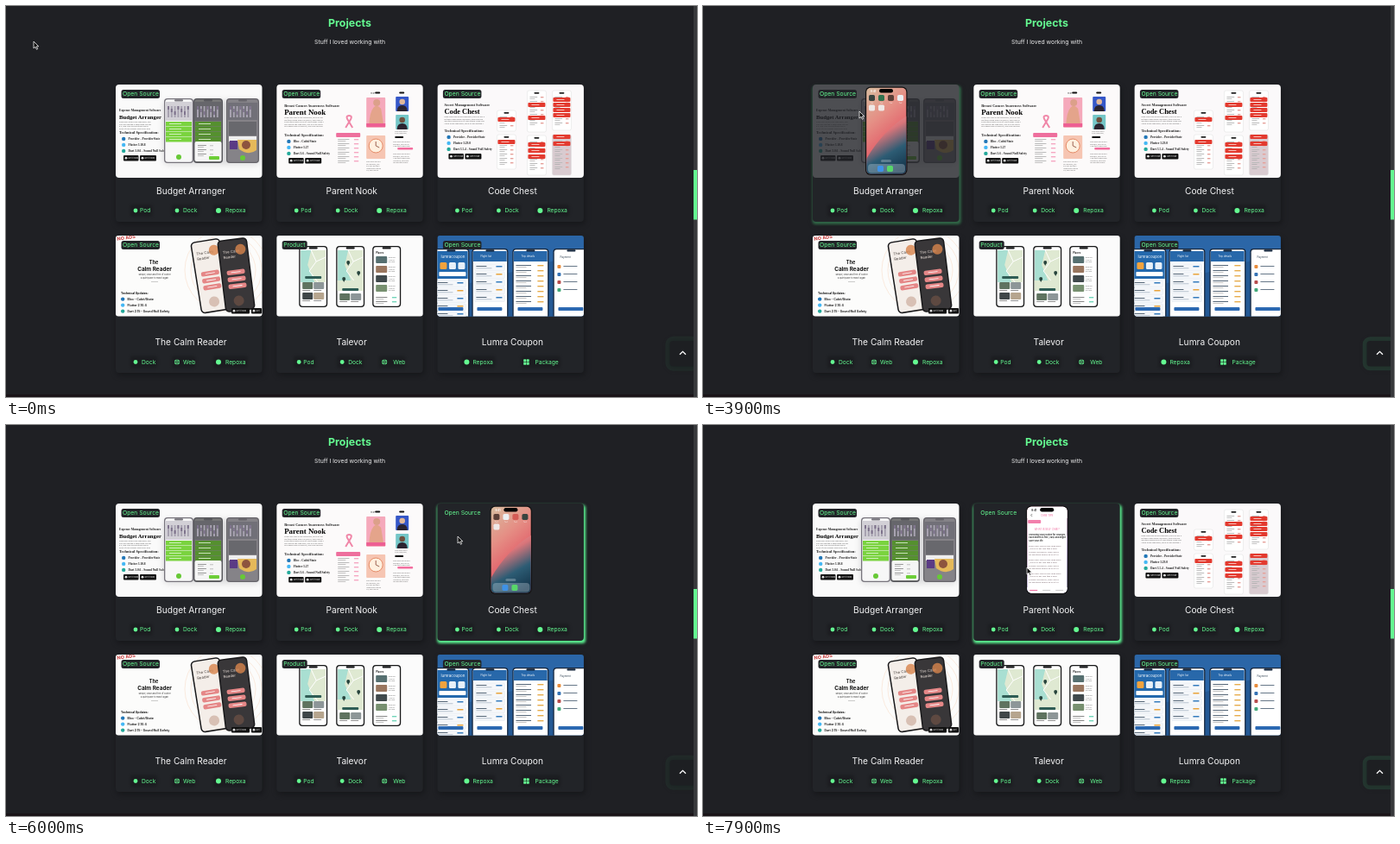
Animation of 800x453 px, one loop 8000 ms. Source, as an HTML page:

```html
<!DOCTYPE html>
<html lang="en">
<head>
<meta charset="utf-8">
<title>Projects</title>
<style>
html, body { margin: 0; width: 100%; height: 100%; overflow: hidden; background: #1f2024; }
svg { position: fixed; left: 0; top: 0; width: 100%; height: 100%; font-family: Inter, "Open Sans", sans-serif; }
.serif { font-family: "Liberation Serif", "Noto Serif", serif; }
.bold { font-weight: 700; }
.mid { text-anchor: middle; }
.glow { filter: blur(1.5px); }
.shade { filter: blur(3px); }
</style>
</head>
<body>
<svg id="stage" viewBox="0 0 800 453"></svg>
<script>
const GREEN = '#64fa91', BG = '#1f2024', CARD = '#222428', DARK = '#1d1f22';
const LOOP = 8000;

// Shape helpers, all returning SVG markup
const rect = (x, y, w, h, fill, r = 0, more = '') =>
  `<rect x="${x}" y="${y}" width="${w}" height="${h}" fill="${fill}" rx="${r}" ${more}/>`;
const dot = (x, y, r, fill, more = '') => `<circle cx="${x}" cy="${y}" r="${r}" fill="${fill}" ${more}/>`;
const text = (x, y, size, str, fill, cls = '') =>
  `<text x="${x}" y="${y}" font-size="${size}" fill="${fill}" class="${cls}">${str}</text>`;
const path = (d, fill, more = '') => `<path d="${d}" fill="${fill}" ${more}/>`;
const group = (x, y, body, more = '') => `<g transform="translate(${x} ${y})" ${more}>${body}</g>`;
const repeat = (n, draw) => Array.from({ length: n }, (_, i) => draw(i)).join('');

const FILLER = 'Keep every note in one calm place, sort it by day and find it again when you need it, with clear lists and quick search on all of your screens. ';
const para = (x, y, n, chars, size = 2.3, step = 2.5, fill = '#555') =>
  repeat(n, i => text(x, y + i * step, size, FILLER.repeat(3).substr(i * chars, chars).trim(), fill, 'serif'));

const badge = (x, y, w) => rect(x, y, w, 6.5, '#111', 1) + dot(x + 3, y + 3.2, 1.4, '#ddd') +
  text(x + 5.5, y + 4.4, 2.4, w > 14 ? 'Get it now' : 'Get', '#fff');

const bullets = (x, y, list, cls) => list.map((s, i) =>
  dot(x + 2.2, y + i * 7 - 1.4, 2.2, ['#2277b8', '#45b8f5', '#24a99b'][i]) +
  text(x + 7.5, y + i * 7, 3.5, s, '#222', 'bold ' + cls)).join('');

function spec(x, y, tech, kicker, kickSize, name, size, lines, chars, items) {
  return text(x, y, kickSize, kicker, '#222', 'serif bold') +
    text(x, y + 9, size, name, '#000', 'serif bold') + para(x, y + 13, lines, chars) +
    text(x, tech, 4.5, 'Technical Specification:', '#222', 'serif bold') +
    bullets(x + 3, tech + 7.3, items, 'serif') +
    badge(x + 5, tech + 25, 17.5) + badge(x + 24, tech + 25, 19);
}

const device = (x, y, w, h, frame, screen, body) =>
  rect(x, y, w, h, frame, 4) + rect(x + 1.3, y + 1.3, w - 2.6, h - 2.6, screen, 3) +
  group(x, y, body) + rect(x + w / 2 - 5, y + 1.2, 10, 2.2, frame, 1);

const rows = (n, x, y, w, step, a, b) => repeat(n, i =>
  rect(x, y + i * step, w * .55, 1, a) + rect(x + w * .78, y + i * step, w * .22, 1.4, b) +
  rect(x, y + i * step + 2, w * .38, .7, '#aaa'));

function budgetArt() {
  const calendar = repeat(7, i => rect(4 + i * 3.8, 9, 2, 13, '#a7a2b0') + rect(4 + i * 3.8, 9 + i % 3 * 3, 2, 4, '#7e738c'));
  const tiles = (c, y) => repeat(4, i => rect(2, y + i * 6, 30, 5.5, c) + rect(6, y + 2 + i * 6, 14, .8, '#e4f8d8'));
  return rect(0, 0, 170, 108, '#fafafa') +
    spec(4, 31, 57, 'Expense Management Software', 3.6, 'Budget Arranger', 6.7, 4, 40,
      ['Provider - ProviderState', 'Flutter 3.10.8', 'Dart 3.0.6 - Sound Null Safety']) +
    rect(55, 18, 112, 75, '#c8c8ca', 6, 'class="shade" opacity=".6"') +
    device(56, 16, 34, 75, '#77747c', '#f7f7f7', rect(1.3, 4, 31, 22, '#d2d0d6') + calendar + tiles('#7ad33f', 27) + dot(17, 68, 3, '#67c936')) +
    device(90, 16, 34, 75, '#55555a', '#777', rect(1.3, 4, 31, 22, '#66666b') + calendar + tiles('#55902f', 27) +
      rect(1.5, 50, 31, 23, '#f5f5f5', 2) + rows(3, 5, 54, 18, 5, '#999', '#ccc') + rect(18, 67, 12, 4, '#6dce38', 1)) +
    device(128, 16, 38, 75, '#66646a', '#858388', rect(2, 5, 34, 20, '#717078') + calendar + rect(3, 27, 32, 16, '#68686d') +
      rect(3, 44, 32, 6, '#eee') + rect(4, 49, 9, 10, '#5b3b85') + path('M13 48H35V60Q26 67 15 59Z', '#e5b95a') +
      dot(23, 54, 5, '#8d543e') + dot(19, 69, 3, '#67c936'));
}

function careArt() {
  const person = (y, bg, tone) => rect(138, y, 15, 17, bg, 1) + dot(145.5, y + 6, 3.3, tone) + path(`M139.5 ${y + 17}q0-7 6-7t6 7Z`, '#2b2430');
  return rect(0, 0, 170, 108, '#fcfafa') +
    spec(9, 26, 60, 'Breast Cancer Awareness Software', 4.3, 'Parent Nook', 8.9, 5, 50,
      ['Bloc - Cubit/State', 'Flutter 3.27', 'Dart 3.6 - Sound Null Safety']) +
    path('M80 50L86 40q2-4-2-4t-2 4L88 50', 'none', 'stroke="#f087a8" stroke-width="2"') +
    rect(69, 56, 28, 5, '#ee6f9d', 1) + rows(6, 71, 63, 24, 5, '#bbb', '#f5a7c2') +
    rect(104, 15, 22, 35, '#f5a9bb', 1) + path('M107 47q1-15 5-20t9 1l3 19Z', '#e4a48b') + dot(116, 21, 4, '#dca08a') +
    rect(104, 45, 22, 4, '#ed5f93') + text(109, 11, 2.6, '9:41', '#222') + rect(114, 8.5, 6, 2, '#111', 1) +
    rect(142, 8.5, 6, 2, '#111', 1) + person(14, '#3557c8', '#e1b89b') + person(35, '#74c6c7', '#70513f') +
    para(137, 55, 2, 17, 2, 2.2) + rect(104, 59, 22, 27, '#f6c5b2', 1) + dot(115, 71, 8, '#fff0df', 'stroke="#e58b67"') +
    path('M115 66v5l4 2', 'none', 'stroke="#9b6252"') + para(104, 90, 5, 20, 2) +
    rect(137, 60, 10, 2, '#111', 1) + para(135, 67, 3, 24, 2) + rect(140, 73, 18, 2.5, '#f36fa0', 1) + para(135, 81, 5, 24, 2);
}

function codeArt() {
  const panel = (x, y, h, bars, bg = '#fff') => rect(x, y, 22, h, bg, 2, 'stroke="#ddd" stroke-width=".5"') +
    rect(x + 8, y + 2, 6, 1.7, '#222', 1) + rows(Math.floor((h - 9) / 5), x + 3, y + 7, 16, 5, '#bbb', '#e6a09a') +
    bars.map(b => rect(x + 1, y + b, 20, 5, '#e33a2f', 1) + rect(x + 5, y + b + 2, 9, .8, '#ffdcd8')).join('');
  return rect(0, 0, 170, 108, '#fbf9fa') +
    spec(8, 25, 55, 'Secret Management Software', 4.2, 'Code Chest', 8.4, 4, 51,
      ['Provider - ProviderState', 'Flutter 3.29.0', 'Dart 3.5.4 - Sound Null Safety']) +
    panel(69, 30, 24, [8]) + panel(69, 58, 40, [6]) + panel(104, 7, 48, [14, 29]) + panel(104, 59, 46, [8, 15, 22]) +
    panel(133, 7, 46, [8, 14, 20, 26]) + panel(133, 58, 47, [0, 8], '#d9cbd0');
}

function readerArt() {
  const slab = (x, y, a, body, ink) => `<g transform="translate(${x} ${y}) rotate(${a})">` +
    rect(0, 0, 35, 84, '#18181a', 5) + rect(1.5, 1.5, 32, 81, body, 4) +
    text(5, 16, 4.4, 'The Calm', ink) + text(5, 22, 4.4, 'Reader', ink) + dot(26, 13, 6, '#d9854d', 'opacity=".8"') +
    repeat(3, i => rect(7, 36 + i * 8, 21, 5.5, '#e58787', 2) + rect(12, 38.3 + i * 8, 11, .8, '#fff')) +
    dot(17, 72, 6, '#a46b50', 'opacity=".35"') + '</g>';
  return rect(0, 0, 170, 94, '#fcfcfb') +
    repeat(5, i => dot(128, 40, 20 + i * 7, 'none', 'stroke="#f2b080" stroke-width=".4" opacity=".6"')) +
    `<g transform="rotate(-8)">${text(1, 6, 5.5, 'NO ADS', '#c83a3a', 'bold')}</g>` +
    text(44, 33, 5.5, 'The', '#111', 'bold mid') + text(45, 40.5, 6.4, 'Calm Reader', '#111', 'bold mid') +
    text(45, 46, 2.5, 'Simple, clear and free of clutter', '#333', 'mid') +
    text(45, 50, 2.4, 'a quiet place to read it again', '#333', 'mid') + rect(41, 53, 8, .5, '#999') +
    text(6, 68, 3.4, 'Technical Updates:', '#111', 'bold') +
    bullets(6, 75, ['Bloc - Cubit/State', 'Flutter 2.10.4', 'Dart 2.15 - Sound Null Safety'], '') +
    slab(86, 8, -9, '#f4eee9', '#4c4440') + slab(117, 6, -7, '#393739', '#eadfd8') +
    badge(134, 84, 21) + badge(157, 84, 12);
}

function storyArt() {
  const map = path('M2 5H31V42H2Z', '#dfe9d2') + path('M2 5H14L10 22 18 42H2Z', '#a9dfd2') +
    path('M14 5L20 18 12 29 22 42M20 18L31 13', 'none', 'stroke="#fff"');
  const photos = (y, n) => repeat(n, i => rect(4 + i % 2 * 13, y + (i >> 1) * 12, 12, 8, ['#5f7360', '#8d9698', '#3f4648', '#b6a58e'][i % 4], 1) +
    rect(4 + i % 2 * 13, y + 9 + (i >> 1) * 12, 9, .8, '#777'));
  const pin = (x, y) => dot(x, y, 2, '#27443d') + path(`M${x - 1.5} ${y + 1}l1.5 3 1.5-3Z`, '#27443d');
  return rect(0, 0, 170, 94, '#fbfbfb') +
    device(26, 12, 33, 71, '#161718', '#fff', map + rect(7, 35, 19, 3, '#2f5d55', 1) + photos(42, 4)) +
    device(69, 12, 33, 71, '#161718', '#fff', map + rect(1.5, 40, 30, 12, '#dfe9d2') + pin(14, 19) + pin(26, 31) + pin(9, 38) + rect(7, 49, 19, 3, '#2f5d55', 1) + photos(55, 2)) +
    device(111, 12, 33, 71, '#161718', '#fff', text(4, 9, 2.8, 'Places', '#222', 'bold') +
      repeat(4, i => rect(4, 12 + i * 11, 13, 8, ['#566f70', '#99765f', '#40494c', '#779070'][i], 1) + para(18.5, 14 + i * 11, 3, 9, 2)) + rows(2, 4, 59, 24, 5, '#888', '#72d5ba'));
}

function couponArt() {
  const head = rect(1.3, 3, 39, 12, '#2868aa');
  const list = y => repeat(5, i => rect(3, y + i * 9, 35, 7.5, '#f5f7fa', 1, 'stroke="#cad6e2" stroke-width=".3"') +
    rect(5, y + 2 + i * 9, 12, 1, '#567') + rect(28, y + 2 + i * 9, 7, 1.5, i % 2 ? '#e9a33b' : '#347bbd') + rect(5, y + 4.5 + i * 9, 18, .7, '#9ab'));
  const foot = rect(6, 68, 29, 4, '#2c69b2', 1);
  return rect(0, 0, 170, 94, '#2b66a7') + path('M0 65L170 20V94H0Z', '#245994') +
    device(-5, 15, 42, 86, '#15263d', '#fff', rect(1.3, 3, 39, 32, '#2469ad') + text(9, 11, 4.5, 'lumracoupon', '#fff') +
      repeat(3, i => rect(8 + i * 10.5, 16, 8, 8, ['#f2a33d', '#e8f0f8', '#e8f0f8'][i], 1.5)) + rect(7, 27, 31, 5, '#fff', 1) + list(37) + foot) +
    device(40, 15, 42, 86, '#15263d', '#fff', head + text(10, 10, 3, 'Flight list', '#fff') + list(18) + foot) +
    device(87, 15, 42, 86, '#15263d', '#fff', head + text(10, 10, 3, 'Trip details', '#fff') + rows(8, 4, 19, 32, 6, '#567', '#e7ac4c') + foot) +
    device(134, 15, 42, 86, '#15263d', '#fff', text(8, 11, 3, 'Payment', '#345') +
      repeat(4, i => rect(5, 19 + i * 9, 4, 4, ['#e78c3c', '#3572b4', '#b74d4d', '#42a879'][i], 1) + rect(12, 20 + i * 9, 16, 1, '#678')) + foot);
}

function home(i) {
  const tints = ['#39443f', '#31724e', '#5d4038', '#eceff2', '#d35b55'];
  const icon = (x, y, c) => rect(x, y, 7, 7, c, 1.7);
  return rect(61, 2, 49, 104, `url(#sky${i % 2})`) + path('M110 36Q82 52 61 88V106H110Z', `url(#hill${i % 2})`) +
    text(67, 9, 3, '9:41', '#fff', 'bold') +
    repeat(4, n => icon(65 + n * 11, 12, tints[(n + i) % 5]) + text(68.5 + n * 11, 21.5, 1.8, 'Tool', '#fff', 'mid')) +
    repeat(i < 2 ? 2 : 1, n => icon(65 + n * 11, 23.5, i === 1 ? '#f18cae' : '#efe8e6')) +
    rect(79, 87, 12, 3, '#fff', 1.5, 'opacity=".25"') + rect(64, 92, 43, 10.5, '#dce8f2', 4, 'opacity=".3"') +
    icon(75, 94, '#3f92e6') + icon(86, 94, '#58d66a');
}

function page(i) {
  const accent = ['#6dca3b', '#ee6b9e', '#e33a2f'][i];
  const bar = rect(61, 2, 49, 15, '#fff') + text(67, 9, 3, '9:41', '#222', 'bold') + path('M68 12l-1.5 1.5 1.5 1.5', 'none', 'stroke="#333" stroke-width=".6"') +
    text(85, 15, 2.8, ['Overview', 'CARE TIPS', 'Sign in'][i], accent, 'mid');
  const story = rect(63, 19, 15, 4, '#f27fac', 1) + text(85, 31, 2.8, 'WHAT IS SELF CARE?', accent, 'mid') +
    ['Checking your routine for changes', 'each month is free, easy and might', 'save your life.'].map((s, n) => text(64, 36.5 + n * 3.5, 2.5, s, '#333', 'bold')).join('') +
    repeat(3, n => para(64, 50 + n * 16, 4, 33, 2.7, 3.4, '#6a535b'));
  const list = rect(64, 22, 43, 17, accent, 2) + rows(9, 66, 46, 38, 6, '#888', accent);
  return rect(61, 2, 49, 104, '#fff') + `<g id="scroll${i}">${i === 1 ? story : list}</g>` + bar +
    rect(61, 97, 49, 9, '#fff') + repeat(3, n => rect(65 + n * 15, 100, 9, 1, n ? '#ccc' : accent));
}

const phone = i => `<g id="phone${i}">` + rect(61, 2.5, 48.5, 102.5, '#111', 6) +
  `<g clip-path="url(#screen)">${home(i)}<g id="page${i}">${page(i)}</g></g>` + rect(77, 5, 16, 4.5, '#000', 2.2) + '</g>';

function linkIcon(kind, x, y) {
  if (kind === 'Web') return dot(x, y, 3, GREEN) +
    path(`M${x - 3} ${y}h6M${x} ${y - 3}v6M${x} ${y - 3}q-3.2 3 0 6q3.2-3 0-6`, 'none', `stroke="${CARD}" stroke-width=".6"`);
  if (kind === 'Package') return repeat(4, i => rect(x - 3.2 + i % 2 * 3.5, y - 3.3 + (i >> 1) * 3.5, 3, 3, GREEN, .5));
  return dot(x, y, kind === 'Repoxa' ? 3 : 2.4, GREEN);
}

// Each link: label, icon x, text x
const firstRow = [['Pod', 23, 28], ['Dock', 71, 78], ['Repoxa', 119, 127]];
const cards = [
  ['Budget Arranger', 'Open Source', budgetArt, firstRow],
  ['Parent Nook', 'Open Source', careArt, firstRow],
  ['Code Chest', 'Open Source', codeArt, firstRow],
  ['The Calm Reader', 'Open Source', readerArt, [['Dock', 23, 30], ['Web', 71, 78], ['Repoxa', 119, 127]]],
  ['Talevor', 'Product', storyArt, [['Pod', 26, 31], ['Dock', 76, 83], ['Web', 125, 135]]],
  ['Lumra Coupon', 'Open Source', couponArt, [['Repoxa', 34, 41], ['Package', 103, 113]]]
];

function card([name, tag, art, links], i) {
  const top = i < 3, y = top ? 146 : 146.5;
  return group(127 + i % 3 * 186.2, top ? 91 : 266,
    rect(1, 3, 170, 159, '#121316', 4, 'class="shade" opacity=".7"') +
    (top ? rect(-.3, 1.5, 172, 160.5, '#5cf292', 4, `class="glow" id="glow${i}" opacity="0"`) : '') +
    rect(0, 0, 169.5, 159, CARD, 4) +
    `<g id="art${i}" clip-path="url(#${top ? 'tall' : 'short'})">${art()}</g>` + (top ? phone(i) : '') +
    rect(6.5, 6, tag === 'Product' ? 29 : 44.5, 10, CARD, 2.5) + text(8, 13.3, 6.8, tag, GREEN) +
    text(87, 127, 10.2, name, '#f4f4f5', 'mid') +
    links.map(([label, ix, tx]) => rect(ix - 6, y - 7, tx - ix + label.length * 3.8 + 9, 14, '#17181b', 3, 'class="glow" opacity=".55"') +
      linkIcon(label, ix, y) + text(tx, y + 2.4, 6.7, label, GREEN)).join(''));
}

const gradient = (id, colors) => `<linearGradient id="${id}" x1=".2" y1="0" x2=".6" y2="1">` +
  colors.map((c, i) => `<stop offset="${i / (colors.length - 1)}" stop-color="${c}"/>`).join('') + '</linearGradient>';

const $ = id => document.getElementById(id);
$('stage').innerHTML = '<defs>' +
  gradient('sky0', ['#d9b79c', '#e58f85', '#e2606a', '#a84458']) +
  gradient('hill0', ['#f0a49c', '#d9757a', '#2d5c74', '#15364c']) +
  gradient('sky1', ['#e9709e', '#c45fa9', '#7b4fb4', '#40307c']) +
  gradient('hill1', ['#d9b4e8', '#a887d8', '#5a4398', '#262353']) +
  `<clipPath id="tall">${rect(0, 0, 169.5, 108, '#000', 4)}</clipPath>` +
  `<clipPath id="short">${rect(0, 0, 169.5, 93.5, '#000', 3)}</clipPath>` +
  `<clipPath id="screen">${rect(62.2, 3.7, 46.1, 100.1, '#000', 5)}</clipPath></defs>` +
  rect(0, 0, 800, 453, BG) + rect(0, 450, 800, 3, '#1a1418') +
  text(398, 24, 12.4, 'Projects', GREEN, 'bold mid') + text(398, 44.3, 6.85, 'Stuff I loved working with', '#ededee', 'mid') +
  cards.map(card).join('') +
  rect(767, 387, 34, 33, '#141518', 6, 'class="shade" opacity=".6"') +
  '<rect id="pulse" fill="#4fd082"/>' + rect(768.5, 388, 30, 29.5, DARK, 4) +
  path('M780 403.8l3.5-3.5 3.5 3.5', 'none', 'stroke="#fff" stroke-width="1.3"') +
  rect(796, 0, 4, 453, '#38393c') + rect(796, 190, 4, 57.5, GREEN) +
  path('M0 0V8L2 6.3 3.4 9.3 4.7 8.7 3.4 5.8H5.8Z', '#111', 'id="cursor" stroke="#fff" stroke-width=".75"');

const clamp = v => Math.max(0, Math.min(1, v));
const ease = v => (v = clamp(v), v * v * (3 - 2 * v));

// Pointer stops: time, x, y
const route = [
  [0, 32, 41], [1000, 32, 41], [1450, 185, 7], [2800, 185, 7], [3250, 87, 60], [3600, 106, 100],
  [3800, 178, 121], [3900, 181, 122], [4500, 190, 122], [4650, 297, 124], [4690, 315, 123], [4800, 344, 122],
  [5400, 352, 123], [5540, 483, 127], [5600, 500, 128], [5750, 523, 129], [7300, 523, 129],
  [7380, 499, 131], [7400, 491, 131], [7450, 482, 133], [7900, 375, 165], [8000, 375, 165]
];
// Hovers: card, enter, leave
const hovers = [[0, 3660, 4650], [1, 4690, 5540], [2, 5600, 7380], [1, 7450, 9000]];
const hoverLevel = (i, t, delay, span) => hovers.reduce((sum, [c, a, b]) =>
  c === i ? sum + clamp((t - a - delay) / span) - clamp((t - b - delay) / span) : sum, 0);

function set(id, attrs) {
  for (const k in attrs) $(id).setAttribute(k, attrs[k]);
}

function draw(t) {
  const n = route.findIndex(p => p[0] > t), [t0, x0, y0] = route[n - 1], [t1, x1, y1] = route[n];
  const k = (t - t0) / (t1 - t0);
  set('cursor', { transform: `translate(${x0 + (x1 - x0) * k} ${y0 + (y1 - y0) * k})` });

  for (let i = 0; i < 3; i++) {
    set('art' + i, { opacity: 1 - hoverLevel(i, t, 0, 300) });
    set('glow' + i, { opacity: hoverLevel(i, t, 150, 250) });
    set('phone' + i, { opacity: hovers.some(([c, a, b]) => c === i && t >= a && t < b) ? 1 : 0 });
    const video = t - hovers[i][1], open = ease((video - 900) / 250);
    set('page' + i, { transform: `translate(85 54) scale(${open}) translate(-85 -54)`, opacity: open ? 1 : 0 });
    set('scroll' + i, { transform: `translate(0 ${i === 1 ? 14 * (1 - ease((video - 2600) / 550)) : -10 * ease((video - 1300) / 400)})` });
  }

  // Ring grows and fades over 70% of a two second cycle
  const p = clamp((t + 1300) % 2000 / 1400), s = .6 + p * 4.9;
  set('pulse', { x: 768.5 - s, y: 388 - s, width: 30 + 2 * s, height: 29.5 + 2 * s, rx: 4 + s, opacity: .9 * (1 - p) });
}

const start = performance.now();
function tick() {
  draw(Math.floor((performance.now() - start) % LOOP / 100) * 100);
  requestAnimationFrame(tick);
}
tick();
</script>
</body>
</html>
```
